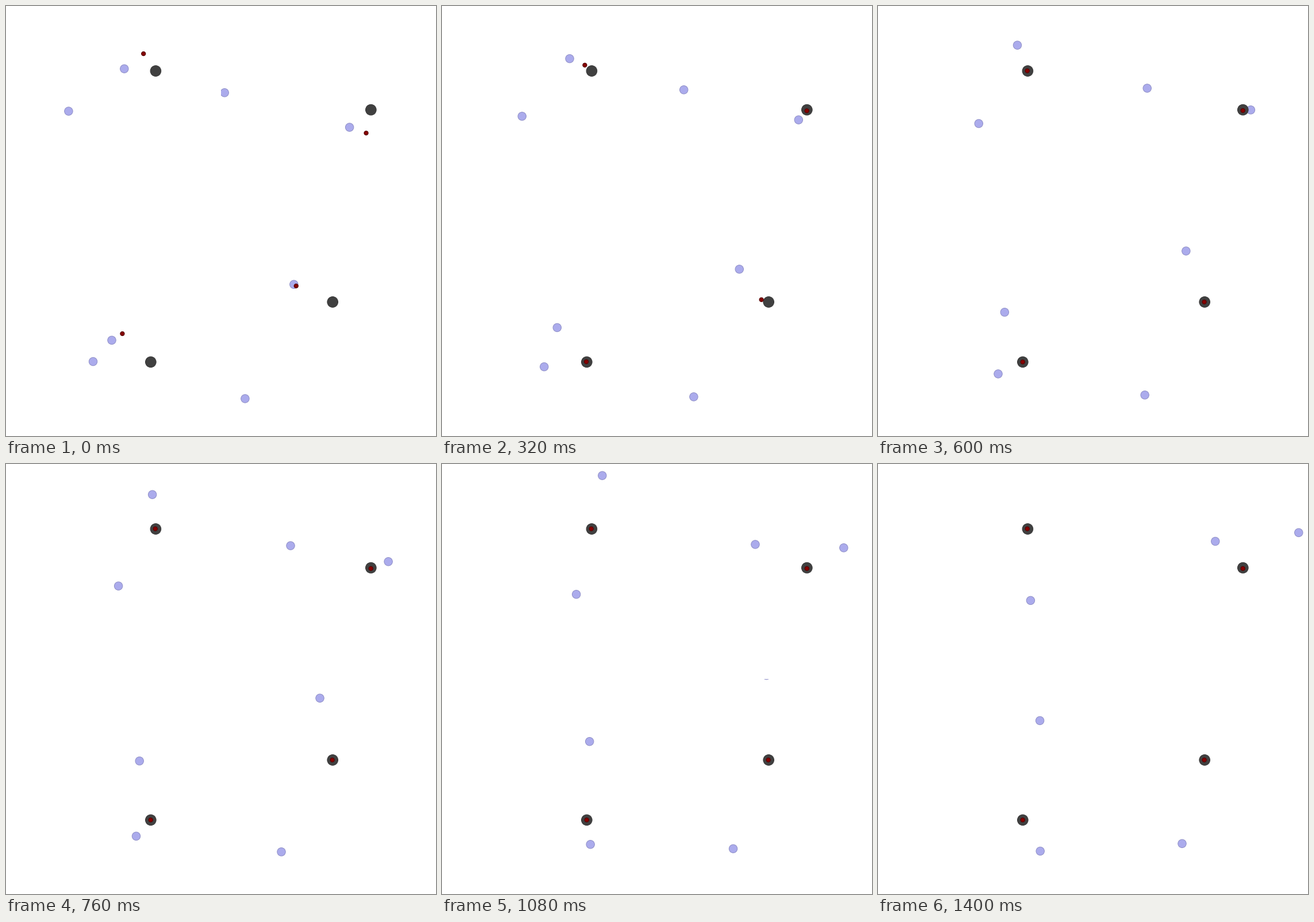
Write a matplotlib script that moves like this. It is 748 px wide and 748 px high and loops after 1.44 s.

```python
import numpy as np
import matplotlib.pyplot as plt
from matplotlib.animation import FuncAnimation
from matplotlib.patches import Circle

SIZE, HALF, DPI = 748, 374, 100
FRAMES, INTERVAL = 36, 40
RAMP = 2.0  # frames the agents need to reach cruising speed

KEYS = np.array([0, 11, 19, 35])
CLOCK = np.arange(FRAMES)

# Each panel has a hidden target, an estimate that locks on to it at a given
# frame (x and y separately), and two agents gliding through a few key points.
PANELS = [
    dict(origin=(0, 0), target=(260.4, 113), start=(239.2, 83),
         end=(259.7, 112.7), lock=(8.2, 7.3),
         paths=[[(205.8, 109.2), (230.6, 82), (254.6, 53.2), (301.5, -17)],
                [(108.9, 183), (154.6, 197), (195.6, 212.2), (265.4, 237.4)]]),
    dict(origin=(HALF, 0), target=(634.8, 180.6), start=(626.5, 221),
         end=(634.7, 181.8), lock=(3.8, 3.55),
         paths=[[(380.2, 150.8), (441, 144.3), (495, 142.1), (586.8, 134.5)],
                [(597.6, 211), (632.1, 191), (665.1, 169.8), (731.8, 119.4)]]),
    dict(origin=(0, HALF), target=(251.8, 619.3), start=(202.4, 570),
         end=(251.7, 619.2), lock=(3.7, 3.25),
         paths=[[(184, 581.4), (208.7, 548.2), (232.2, 516.6), (281.6, 446.4)],
                [(151.5, 618.5), (191.1, 632.7), (226.5, 647.4), (282.2, 673.4)]]),
    dict(origin=(HALF, HALF), target=(568.2, 514.9), start=(504.7, 487),
         end=(567.6, 514.8), lock=(6.55, 6.2),
         paths=[[(500.8, 484.3), (525.3, 444.5), (546, 407.3), (579, 325)],
                [(415.9, 683), (449.1, 678.5), (479, 674.7), (529, 660.3)]]),
]


def travel(t):
    """Time spent moving, with a soft start from rest."""
    return t - RAMP * (1 - np.exp(-t / RAMP))


def glide(points):
    """Cubic through the key points, one position per frame."""
    coeffs = np.polyfit(travel(KEYS), np.array(points), 3)
    return np.stack([np.polyval(c, travel(CLOCK)) for c in coeffs.T], axis=1)


def converge(start, end, lock):
    """Logistic approach from start to end, one position per frame."""
    start, end, lock = map(np.array, (start, end, lock))
    left = (1 + np.exp(-lock)) / (1 + np.exp(CLOCK[:, None] - lock))
    return end + left * (start - end)


def dot(ax, xy, radius, face, edge, z):
    patch = Circle(xy, radius, facecolor=face, edgecolor=edge, linewidth=0.72, zorder=z)
    return ax.add_patch(patch)


fig = plt.figure(figsize=(SIZE / DPI, SIZE / DPI), dpi=DPI, facecolor="white")
moving = []

for panel in PANELS:
    x0, y0 = panel["origin"]
    ax = fig.add_axes([x0 / SIZE, 1 - (y0 + HALF) / SIZE, 0.5, 0.5])
    ax.set_xlim(x0, x0 + HALF)
    ax.set_ylim(y0 + HALF, y0)
    ax.axis("off")

    for points in panel["paths"]:
        track = glide(points)
        moving.append((dot(ax, track[0], 7.2, "#ababec", "#9090c8", 1), track))

    dot(ax, panel["target"], 9.3, "#404040", "#383838", 2)

    track = converge(panel["start"], panel["end"], panel["lock"])
    moving.append((dot(ax, track[0], 3.6, "#860000", "#500000", 3), track))


def update(frame):
    for patch, track in moving:
        patch.center = track[frame]
    return [patch for patch, _ in moving]


anim = FuncAnimation(fig, update, frames=FRAMES, interval=INTERVAL, repeat=True, repeat_delay=0)
plt.show()
```
